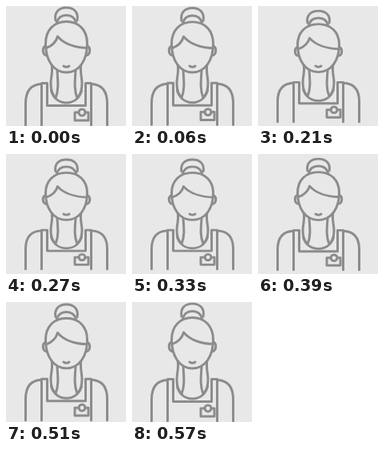
These frames come from a looping animation (150 px wide and 150 px high, 0.6 s). An HTML page:

```html
<!DOCTYPE html>
<html lang="en">
<head>
<meta charset="utf-8">
<style>
html, body { margin: 0; width: 100%; height: 100%; overflow: hidden; background: #e8e8e8; }
svg { display: block; width: 100%; height: 100%; }
#figure { fill: none; stroke: #8c8c8c; stroke-width: 3; stroke-linecap: round; stroke-linejoin: round; }
.solid { fill: #e8e8e8; }
</style>
</head>
<body>
<svg viewBox="0 0 150 150">
  <g id="figure">
    <!-- bun -->
    <path d="M62 18C60 8 66 2 75.500 2S91 8 89 18"/>
    <path d="M63.500 21C65 14.500 69 11.500 75.500 11.500S86 14.500 87.500 21"/>
    <!-- shoulders, collar and apron -->
    <path d="M24.500 149V122C24.500 107 31 98 44.500 97.500M106.500 97.500C120 98 126.500 107 126.500 122V149"/>
    <path d="M56.500 106C60 117 68 121 75.500 121S91 117 94.500 106"/>
    <path d="M44.500 149V96.500H51.500V124.500H99.500V96.500H106.500V149"/>
    <path d="M91 133H86V143H103V133H99"/>
    <circle cx="95" cy="133" r="4"/>
    <!-- locks and neck -->
    <path d="M57 72C59 82 56 88 56 97C56 106 58 111 62 115C66 105 65 95 64 81"/>
    <path d="M94 72C92 82 95 88 95 97C95 106 93 111 89 115C85 105 86 95 87 81"/>
    <!-- head -->
    <path d="M50 50C45 50 44.500 61 51.500 62M101 50C106 50 106.500 61 99.500 62"/>
    <path class="solid" d="M49.500 47C49.500 30 60 19.500 75.500 19.500S101.500 30 101.500 47C101.500 67 92 83 75.500 83S49.500 67 49.500 47Z"/>
    <path d="M50.500 52.500C57 50 62.500 45 64.500 38C72 47 86 52 101 52.500"/>
    <path d="M72 75Q75.500 77.500 79 75"/>
  </g>
</svg>
<script>
const period = 600, steps = 20, middle = 75, squash = 0.07;
const figure = document.getElementById('figure');

function draw(ms) {
  const phase = Math.floor(ms % period / period * steps) / steps;
  const scale = 1 - squash * (1 - Math.cos(2 * Math.PI * phase)) / 2;
  figure.setAttribute('transform', `translate(0 ${middle * (1 - scale)}) scale(1 ${scale})`);
}

const start = performance.now();
function tick() {
  draw(performance.now() - start);
  requestAnimationFrame(tick);
}
draw(0);
requestAnimationFrame(tick);
</script>
</body>
</html>
```
